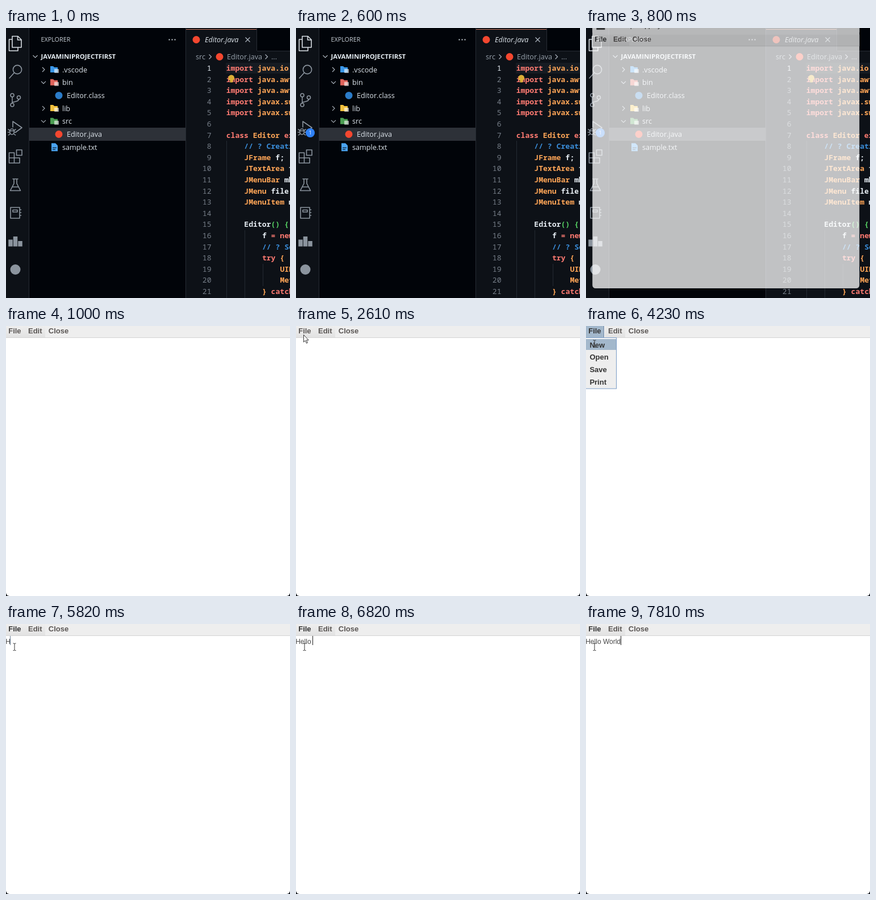
These frames come from a looping animation (500 by 474 pixels, 8000 ms). An HTML page:

```html
<!DOCTYPE html>
<html lang="en">
<head>
<meta charset="utf-8">
<title>Text editor demo</title>
<style>
html, body { margin: 0; width: 100%; height: 100%; overflow: hidden; background: #010409; }
svg { position: absolute; left: 0; top: 0; display: block; }
text { white-space: pre; }
.ui { font-family: "Open Sans", "Noto Sans", sans-serif; font-size: 12.6px; fill: #dce3ea; }
.crumb { fill: #98a2ac; }
.code { font-family: "Noto Sans Mono", "DejaVu Sans Mono", monospace; font-size: 13.1px; font-weight: 600; fill: #e6edf3; }
.num { font-weight: 400; fill: #767e88; text-anchor: end; }
.k { fill: #ff7b72; } .t { fill: #ffa657; } .c { fill: #3b8fdc; } .g { fill: #56d364; } .y { fill: #ffa657; }
.line { fill: none; stroke: #8b949e; stroke-width: 1.6; stroke-linejoin: round; stroke-linecap: round; }
.thin { fill: none; stroke: #b1bac4; stroke-width: 1.1; }
.menu { font: bold 13px "Liberation Sans", Arial, sans-serif; fill: #5a5654; }
.item { fill: #333; }
.typed { font: 12px "Liberation Sans", Arial, sans-serif; fill: #4a4a4a; }
</style>
</head>
<body>
<svg id="stage" width="500" height="474" viewBox="0 0 500 474">
  <defs>
    <linearGradient id="bar" x1="0" y1="0" x2="0" y2="1">
      <stop offset="0" stop-color="#eee"/><stop offset="1" stop-color="#e2e2e2"/>
    </linearGradient>
  </defs>

  <g id="ide">
    <rect width="500" height="474" fill="#0d1117"/>
    <rect x="41" width="275" height="474" fill="#010409"/>
    <rect x="442" width="58" height="40" fill="#010409"/>
    <path d="M40.5 0V474M316.5 0V474M441.5 0V40M442 40.5H500" stroke="#272c34" fill="none"/>
    <rect x="317" y="2" width="124" height="1" fill="#c9785f"/>
    <rect x="41" y="175" width="275" height="23" fill="#2d3138"/>
    <rect x="387" y="61" width="113" height="19" fill="#161b22"/>
    <path d="M388.5 198V474M420.5 355V474M452.5 414V453" stroke="#242a32" fill="none"/>

    <g class="line">
      <path stroke="#d7dde3" d="M11 14.5H21L27 20.5V34H11ZM20.5 14.5V21H27M11 20H5.5V40H21V34.5"/>
      <circle cx="20" cy="73" r="7.6"/><path d="M14.5 78.5L6 88"/>
      <circle cx="11" cy="118" r="3"/><circle cx="11" cy="135" r="3"/><circle cx="22.5" cy="122" r="3"/>
      <path d="M11 121V132M22.5 125C22.5 129 17 128.5 11.5 130.5"/>
      <path d="M12 174V164L28 175L17 183"/>
      <ellipse cx="10.5" cy="182" rx="3.8" ry="5"/><path d="M7 180.5H14M4 178L7 180M17 178L14 180M3.5 183H6.5M14.5 183H17.5M4.5 188L7.5 185.5M16.5 188L13.5 185.5"/>
      <path d="M5.500 219H14.500V237H5.500ZM5.500 228H24V237H14.500V228M18.500 214H28V223.500H18.500Z"/>
      <path d="M12 265H21M14 265V273L7.5 285.5H25.5L19 273V265M11 279H22"/>
      <path d="M8 315H24V334H8ZM24 319H26.5M24 324H26.5M24 329H26.5M12 319.5H20V323H12Z"/>
    </g>
    <path d="M8 371.5V383.5M16.5 366V383.5M25 374V383.5" stroke="#8b949e" stroke-width="7.5"/>
    <circle cx="16.5" cy="424" r="9" fill="#8b949e"/>
    <g id="badge">
      <circle cx="25" cy="184" r="8" fill="#2f81f7"/>
      <text class="ui" x="25" y="187.3" text-anchor="middle" style="font-size:9px;fill:#fff">1</text>
    </g>

    <text class="ui" x="61.5" y="24.3" style="font-size:10.8px;fill:#c9d1d9">EXPLORER</text>
    <path d="M286.5 20.5h2m3 0h2m3 0h2" stroke="#c9d1d9" stroke-width="2"/>
    <text class="ui" x="61.5" y="54.2" style="font-size:11.4px;font-weight:700;fill:#e6edf3">JAVAMINIPROJECTFIRST</text>
    <g id="tree"></g>

    <circle cx="335" cy="20.5" r="6.5" fill="#f4472f"/>
    <text class="ui" x="350" y="25" font-style="italic">Editor.java</text>
    <path class="thin" d="M421.5 16.5l8 8m0-8l-8 8"/>
    <text class="ui crumb" x="334" y="55">src</text>
    <path class="thin" d="M357.5 46.5l4 4l-4 4M456.5 46.5l4 4l-4 4"/>
    <circle cx="376" cy="50.5" r="6.5" fill="#f4472f"/>
    <text class="ui crumb" x="389" y="55">Editor.java</text>
    <text class="ui crumb" x="467" y="55">...</text>
    <g id="code"></g>
    <circle cx="396.7" cy="87.5" r="5.3" fill="#dcae35"/><rect x="394.5" y="92" width="4.5" height="3.5" fill="#dcae35"/>
  </g>

  <g id="win">
    <rect y="-30" width="500" height="504" rx="6" fill="#fff"/>
    <rect y="-30" width="500" height="30" rx="6" fill="#f6f6f6"/>
    <rect x="7.5" y="-26" width="16" height="16" fill="#444"/>
    <text class="ui" x="40" y="-14.5" style="font-size:12px;fill:#222">A simple app by me</text>
    <rect y="-1" width="500" height="21" fill="#eee"/>
    <rect width="69" height="20" fill="url(#bar)"/>
    <rect y="20" width="500" height="1" fill="#d4d4d4"/>
    <g id="lit">
      <rect width="31" height="20" fill="#a3b8cc"/>
      <path d="M31.5 0V20" stroke="#6f86a3"/><path d="M32.5 0V20" stroke="#fff"/>
    </g>
    <text class="menu" id="file" x="4.2" y="12.5">File</text>
    <text class="menu" x="39" y="12.5">Edit</text>
    <text class="menu" x="74.8" y="12.5">Close</text>
    <text class="typed" id="typed" x="-0.8" y="35"></text>
    <rect id="caret" y="21" width="1" height="16"/>
  </g>

  <g id="drop">
    <rect x="-1" y="20.5" width="54.5" height="89.5" fill="#eee" stroke="#7a9cc6"/>
    <path d="M0 21.5H53" stroke="#fff"/>
    <rect id="hover" y="23" width="53" height="19" fill="#a3b8cc"/>
    <g id="items"></g>
  </g>
  <path id="arrow" d="M.5 .5V13.2L3.4 10.5L5.4 15.3L7.4 14.4L5.4 9.8H9.2Z" fill="#fff" stroke="#222" stroke-width=".9"/>
  <path id="beam" d="M-2.5 -6H-.8L0 -5.2L.8 -6H2.5M0 -5.5V6M-2.5 6.5H-.8L0 5.7L.8 6.5H2.5" fill="none" stroke="#333"/>
</svg>
<script>
const $ = id => document.getElementById(id);
const LOOP = 8000;

// sidebar rows: kind, label, colour, indent, chevron
const rows = [
  ["folder", ".vscode", "#3a96e8", 0, ">"],
  ["folder", "bin", "#e0645c", 0, "v"],
  ["dot", "Editor.class", "#2b7cc9", 8],
  ["folder", "lib", "#f2c03c", 0, ">"],
  ["folder", "src", "#4b9e52", 0, "v"],
  ["dot", "Editor.java", "#f4472f", 8],
  ["page", "sample.txt", "#4aa3f0", 0]
];
const chevron = (x, y, open) => `<path class="thin" d="${open
  ? `M${x - 4} ${y - 2}l4 4l4 -4` : `M${x - 2} ${y - 4}l4 4l-4 4`}"/>`;
const icons = {
  folder: (x, y, c) => `<path fill="${c}" d="M${x - 7} ${y - 6}h5l2 2h6v9h-13z"/>
    <rect x="${x}" y="${y - 1}" width="8" height="7" rx="1" fill="#fff" opacity=".6"/>`,
  dot: (x, y, c) => `<circle cx="${x}" cy="${y}" r="6.5" fill="${c}"/>`,
  page: (x, y, c) => `<path fill="${c}" d="M${x - 5} ${y - 7}h7l4 4v10h-11z"/>
    <path d="M${x - 3} ${y + 1}h7m-7 3h5" stroke="#010409"/>`
};
$("tree").innerHTML = chevron(51.5, 50, true) + rows.map(([kind, label, color, dx, chev], i) => {
  const y = 73 + i * 22.7;
  return (chev ? chevron(66, y, chev === "v") : "") + icons[kind](85 + dx, y, color) +
    `<text class="ui" x="${99 + dx}" y="${y + 4.5}">${label}</text>`;
}).join("");

// code lines: indent, then class:text runs separated by "|"
const lines = [
  "0 k:import |t:java.io.*;", "0 k:import |t:java.awt.*;", "0 k:import |t:java.awt.event.*;",
  "0 k:import |t:javax.swing.*;", "0 k:import |t:javax.swing.text.*;", "",
  "0 k:class |t:Editor |k:extends", "4 c:// ? Creating", "4 t:JFrame|n: f;", "4 t:JTextArea|n: t;",
  "4 t:JMenuBar|n: mb;", "4 t:JMenu|n: file;", "4 t:JMenuItem|n: m;", "",
  "4 n:Editor|g:() {", "8 n:f |k:= new", "8 c:// ? Set", "8 k:try |y:{",
  "12 t:UIManager", "12 t:MetalTheme", "8 y:} |k:catch"
];
$("code").innerHTML = lines.map((line, i) => {
  const y = (75 + i * 19.6).toFixed(1), cut = line.indexOf(" ");
  const runs = line && line.slice(cut + 1).split("|")
    .map(r => `<tspan class="${r[0]}">${r.slice(2)}</tspan>`).join("");
  return `<text class="code num" x="361.5" y="${y}"${i ? "" : ' style="fill:#e6edf3"'}>${i + 1}</text>` +
    (line ? `<text class="code" x="${387.7 + 7.9 * line.slice(0, cut)}" y="${y}">${runs}</text>` : "");
}).join("");

$("items").innerHTML = ["New", "Open", "Save", "Print"].map((s, i) =>
  `<text class="menu item" x="6.4" y="${37.5 + i * 21.7}">${s}</text>`).join("");

// pointer: time, shape, x, y
const pointer = [
  [0, ""], [1810, "arrow", 418, 201], [2010, "arrow", 270, 128], [2210, "arrow", 118, 60],
  [2410, "arrow", 38, 24], [2610, "arrow", 13, 15], [2800, "arrow", 12, 14], [3010, "arrow", 13, 14],
  [3810, "arrow", 13, 18], [4010, "beam", 15, 27], [4230, "beam", 15, 31], [4420, "beam", 15, 35],
  [4610, "beam", 15, 38], [4810, "beam", 15, 40]
];
const phrase = "Hello World", typeStart = 5820;
const at = (table, t) => table.filter(step => step[0] <= t).pop();
const show = (id, on) => $(id).setAttribute("display", on ? "inline" : "none");

function draw(t) {
  const opening = t >= 800 && t < 1000;
  show("badge", t >= 400);
  show("win", t >= 800);
  $("win").setAttribute("transform", opening ? "translate(11.3 12.5) scale(.94 .938)" : "");
  $("win").setAttribute("opacity", opening ? .745 : 1);

  const open = t >= 3420 && t < 4610;
  show("lit", open);
  show("drop", open);
  show("hover", t >= 4010);
  $("file").style.fill = opening || t >= 3420 ? "#333" : "#5a5654";

  const [, shape, x, y] = at(pointer, t);
  for (const id of ["arrow", "beam"]) {
    show(id, shape === id);
    if (shape === id) $(id).setAttribute("transform", `translate(${x} ${y})`);
  }

  const count = t < typeStart ? 0 : Math.min(phrase.length, Math.floor((t - typeStart + 10) / 200) + 1);
  const typed = $("typed");
  typed.textContent = phrase.slice(0, count);
  show("caret", count > 0);
  if (count) {
    $("caret").setAttribute("x", Math.round(typed.getComputedTextLength() - 1.2));
    $("caret").setAttribute("fill", count > 1 ? "#222" : "#6a8098");
  }
}

const start = performance.now();
function tick() {
  draw((performance.now() - start) % LOOP);
  requestAnimationFrame(tick);
}
tick();
</script>
</body>
</html>
```
